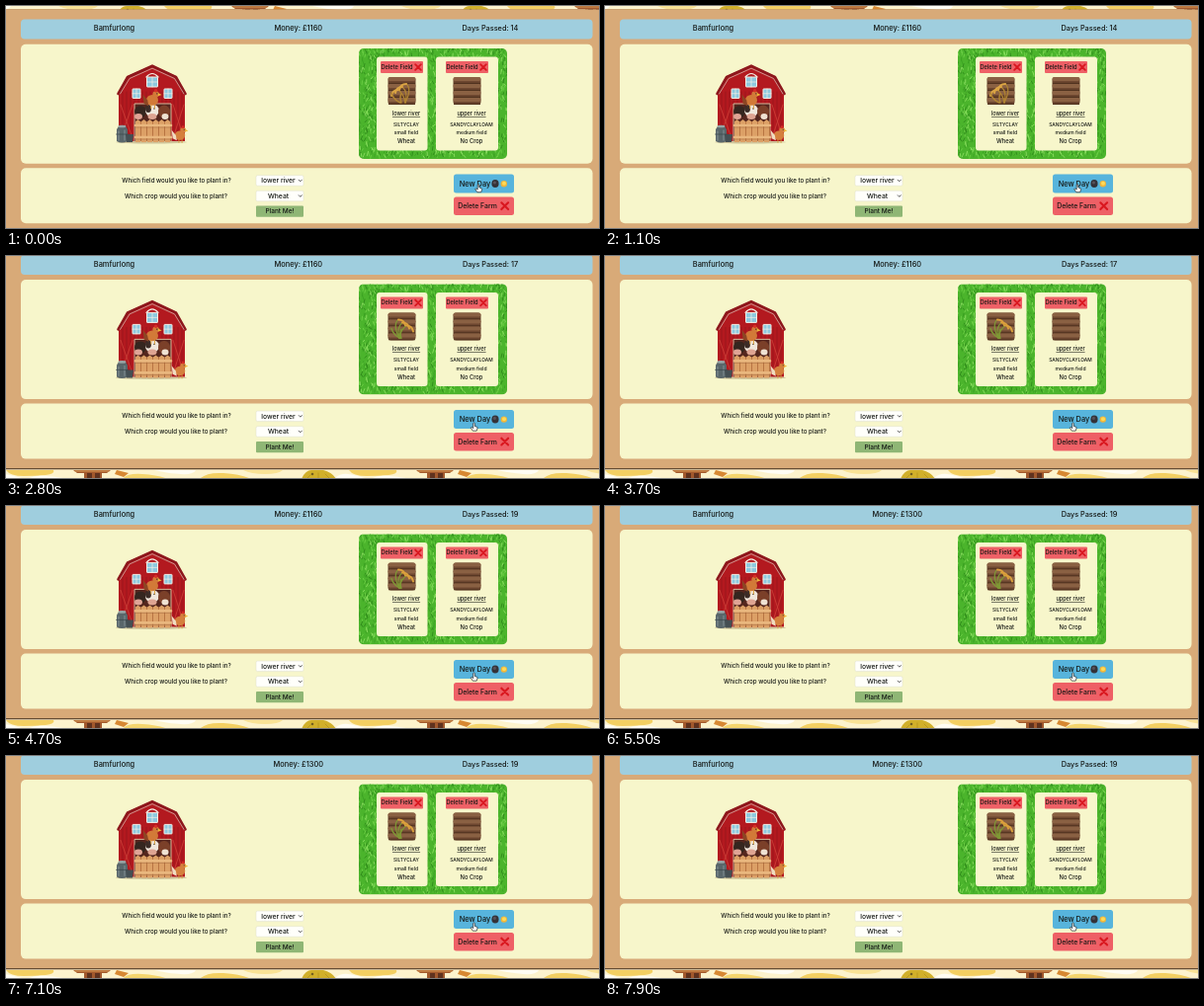
Animation, 600 px wide and 225 px high, one loop 8 s. Source, as an HTML page:

```html
<!DOCTYPE html>
<html lang="en">
<head>
<meta charset="utf-8">
<title>Farm dashboard</title>
<style>
html, body { margin: 0; width: 100%; height: 100%; overflow: hidden; background: #d8aa78; }
svg { display: block; width: 600px; height: 225px; }
text { font-family: Inter, "Open Sans", sans-serif; font-weight: 500; text-anchor: middle; fill: #141714; }
.line { fill: none; stroke-linecap: round; }
</style>
</head>
<body>
<svg id="stage" viewBox="0 0 600 225"></svg>
<script>
const stage = document.getElementById('stage');
const cream = '#f7f6cb', sky = '#9fcede', skyHover = '#57b4dc', red = '#ee6066', redHover = '#df575d';

const rect = (x, y, w, h, fill, r = 0, more = '') =>
  `<rect x="${x}" y="${y}" width="${w}" height="${h}" rx="${r}" fill="${fill}" ${more}/>`;
const ellipse = (x, y, rx, ry, fill) =>
  `<ellipse cx="${x}" cy="${y}" rx="${rx}" ry="${ry}" fill="${fill}"/>`;
const dot = (x, y, r, fill) => ellipse(x, y, r, r, fill);
const shape = (d, fill) => `<path d="${d}" fill="${fill}"/>`;
const line = (d, stroke, width) =>
  `<path class="line" d="${d}" stroke="${stroke}" stroke-width="${width}"/>`;
// y is the visual middle of the line of text
const label = (str, x, y, size, more = '') =>
  `<text x="${x}" y="${y + size * .36}" font-size="${size}" ${more}>${str}</text>`;
const cross = (x, y, r) =>
  line(`M${x - r} ${y - r}L${x + r} ${y + r}M${x + r} ${y - r}L${x - r} ${y + r}`, '#d9171f', r * .62);

let seed = 7;
const random = () => (seed = seed * 16807 % 2147483647) / 2147483647;

function pattern(y, h, shift) {
  let s = `<svg x="0" y="${y}" width="600" height="${h}">` + rect(0, 0, 600, h, '#fdf3cd');
  for (let k = -1; k < 3; k++) {
    const x = k * 347 + shift;
    s += shape(`M${x} 0h48q2 4 -8 5t-22 1q-14 0 -18 -6z`, '#f3cf62') +
      shape(`M${x + 22} 9q6 -4 18 -3t24 3z`, '#fffdf4') +
      shape(`M${x + 118} 9q4 -6 20 -5t26 5z`, '#f5d56d') +
      shape(`M${x + 150} 0h42q-2 5 -16 4t-26 -4z`, '#fffdf4') +
      shape(`M${x + 196} 9q6 -7 24 -6t28 6z`, '#f3cf62') +
      shape(`M${x + 240} 0h40q-4 4 -18 4t-22 -4z`, '#f9e295') +
      shape(`M${x + 332} 9q6 -6 14 -5t20 5z`, '#fffdf4') +
      // shed and tools
      shape(`M${x + 68} 0h38l-4 3h-5v6h-18v-6h-7z`, '#a2592d') +
      shape(`M${x + 82} 3h5v6h-5zM${x + 90} 3h5v6h-5z`, '#5f321e') +
      line(`M${x + 70} 1h34`, '#dc9c54', 1.2) +
      shape(`M${x + 112} 0l12 3 -5 4 -9 -3z`, '#d78832') +
      // haystack
      shape(`M${x + 299} 9q4 -9 10 -9h12q9 2 13 9z`, '#d1b02a') +
      line(`M${x + 308} 5l-4 4M${x + 316} 3v5M${x + 323} 4l4 4`, '#b4921d', .8) +
      dot(x + 310, 4, 1.3, '#756120');
  }
  return s + '</svg>';
}

function grass() {
  let s = `<clipPath id="lawn">${rect(357, 43, 150, 112, '#000', 5)}</clipPath>` +
    `<g clip-path="url(#lawn)">` + rect(357, 43, 150, 112, '#4bb42c');
  for (const color of ['#2b8519', '#72d34a', '#3aa022', '#93e468']) {
    let d = '';
    for (let i = 0; i < 420; i++)
      d += `M${(357 + random() * 150).toFixed(1)} ${(43 + random() * 112).toFixed(1)}` +
        `l${(random() * 4 - 2).toFixed(1)} ${(-1.5 - random() * 3).toFixed(1)}`;
    s += line(d, color, .8);
  }
  return s + '</g>';
}

function pane(x, y, w, h) {
  return rect(x, y, w, h, '#8dc9df', .5, 'stroke="#f5eee5" stroke-width="1"') +
    line(`M${x + w / 2} ${y}v${h}M${x} ${y + h / 2}h${w}`, '#f5eee5', .7);
}

function hen(x, y, k, body, wing) {
  return `<g transform="translate(${x} ${y}) scale(${k})">` +
    ellipse(0, 2, 5, 4.5, body) + shape('M-4 2l-4 -5 1 8 4 2z', wing) +
    dot(3, -3, 2.7, body) + dot(3, -6, 1.4, '#d62e26') +
    shape('M5 -4l3 1.5 -3 1z', '#f1bb39') + dot(4, -3.5, .5, '#222') +
    line('M-1 6v3M2 6v3', '#d89b35', .8) + '</g>';
}

function barn() {
  let s = ellipse(147, 138, 36, 1.5, '#cfc49a') +
    shape('M114 137V87L123 71 148 60 172 71 181 87V137z', '#b3191f');
  for (let x = 118; x < 180; x += 4) s += line(`M${x} 87v49`, '#8f151b', .6);
  s += line('M113.5 89L123 72 148 60.8 172 72 181.5 89', '#8d171c', 2.6) +
    line('M115.5 89L125 73.5 148 63.2 170.5 73.5 180 89', '#d9c9bd', .7) +
    pane(142.5, 72, 11, 10) + line('M142 72q6 -7 12 0', '#f5eee5', 1.2) +
    pane(128, 84, 8, 9.5) + pane(160, 84, 8, 9.5) +
    rect(130, 99, 37, 38, '#54261e') +
    line('M130 137V99H167V137', '#d8b89a', 1) +
    line('M116 100l12 34M128 100l-12 34M169 100l11 34M180 100l-11 34', '#d04239', .8) +
    // animals behind the fence
    ellipse(136, 107, 6, 6, '#35261f') + ellipse(134, 112, 4, 3, '#e0a596') +
    ellipse(148, 106, 7, 6.5, '#f0e7dc') + ellipse(144, 104, 3, 4, '#3b2b26') +
    ellipse(148, 112, 4.5, 3, '#dea492') + dot(150, 104, .7, '#222') +
    ellipse(160, 107, 6, 6.5, '#7b4029') + ellipse(161, 112, 3.5, 3, '#efe2d2') +
    hen(148, 93, 1.2, '#d27a38', '#8c4523') +
    rect(131, 117, 36, 20, '#b87442');
  for (let x = 131; x < 165; x += 6)
    s += shape(`M${x} 138v-21l2.5 -2 2.5 2v21z`, '#dca066');
  s += line('M131 121h36M131 133h36', '#e9b77e', 2.6) + line('M131 123h36M131 135h36', '#9c653d', .5) +
    // milk churn and pail
    shape('M112 125l2 -3h7l2 3v12q-6 3 -11 0z', '#59666a') + ellipse(117.5, 122, 4, 1.3, '#98a4a5') +
    line('M114 127v9M120 126v10', '#87959a', .9) +
    shape('M121 130h8l-1 8h-6z', '#454f53') + line('M111.5 130h12', '#39454a', .7) +
    hen(176, 129, 1.05, '#d5803d', '#f0dcc0');
  return s;
}

function soil(x, y) {
  let s = rect(x, y, 28, 28, '#6d4730', 3);
  for (let i = 0; i < 4; i++)
    s += rect(x, y + i * 7, 28, 4, '#8a6143', 2) + rect(x + .5, y + 5.8 + i * 7, 27, 1.1, '#50331f', .5);
  return s;
}

// stalks fan out from one root, each ending in a drooping ear
function wheat(stem, ear, side) {
  let s = '';
  for (let i = 0; i < 3; i++) {
    const x = 401 + side * (i * 4 - 4), top = 79 + i * 3;
    s += line(`M${401 - side * 3} 98Q${x - side * 6} ${top + 5} ${x} ${top}`, stem, 1.2) +
      line(`M${x} ${top}q${side * 6} 0 ${side * 7} 6`, ear, 2);
  }
  return s + line('M399 98q-7 -3 -9 -10M400 98q-2 -6 0 -9', stem, 1.4);
}

function card(x, w, mid, title, type, size, crop) {
  return rect(x, 51.5, w, 95, cream, 3) +
    rect(mid - 21.5, 56, 43, 12, red, 1) +
    label('Delete Field', mid - 5, 62, 5.7) + cross(mid + 16.5, 62, 2.9) +
    soil(mid - 14, 72) +
    label(title, mid + 4.5, 109, 5.55, 'text-decoration="underline"') +
    label(type, mid + 4.5, 120.3, 4.85) +
    label(size, mid + 4.5, 128.6, 5) + label(crop, mid + 4.5, 137.2, 5.8);
}

const select = (y, id, value) =>
  rect(253, y, 48, 10.5, '#fffffb', 1.5, 'stroke="#dddcca" stroke-width=".5"') +
  label(value, 275.5, y + 5.2, 6.8, `id="${id}"`) +
  line(`M296.3 ${y + 4.5}l1.5 1.6 1.5 -1.6`, '#333', .8);

stage.innerHTML =
  rect(0, 0, 600, 225, '#d8aa78') +
  `<g id="page">` +
  pattern(0, 3.5, 160) + rect(0, 3.3, 600, .5, '#b38658') +
  rect(15, 13.5, 578.5, 20, sky, 4) + rect(15, 38.7, 578.5, 121, cream, 5) +
  rect(15, 164.2, 578.5, 56, cream, 5) +
  label('Bamfurlong', 109.5, 22.8, 7.45) +
  label('', 295.8, 22.8, 7.45, 'id="money"') + label('', 490, 22.8, 7.3, 'id="days"') +
  `<g id="art">${barn()}${grass()}</g>` +
  card(375, 51.5, 400.5, 'lower river', 'SILTYCLAY', 'small field', 'Wheat') +
  card(435, 63, 466.5, 'upper river', 'SANDYCLAYLOAM', 'medium field', 'No Crop') +
  `<g id="ripe">${wheat('#b08432', '#dba544', -1)}</g>` +
  `<g id="young">${wheat('#7f9a35', '#dca03c', 1)}</g>` +
  label('Which field would you like to plant in?', 172.5, 176.6, 6.15) +
  label('Which crop would you like to plant?', 172, 192.4, 6.15) +
  select(171.7, 'field', 'lower river') + select(187.3, 'crop', 'Wheat') +
  rect(253, 202.5, 48, 11.3, '#8fb675', 1) + label('Plant Me!', 277, 208.1, 6.5) +
  rect(453, 170.5, 61, 19, sky, 2.5, 'id="newDay"') + label('New Day', 474.5, 180, 7.4) +
  ellipse(495, 180, 3.6, 4, '#343238') + dot(494.4, 179, 1.6, '#57525a') +
  dot(503.8, 180.2, 3.2, '#f0b53a') + dot(504, 179.8, 2, '#ffdb58') +
  rect(453, 193.5, 61, 18.5, red, 2.5, 'id="remove"') + label('Delete Farm', 477, 202.7, 6.9) +
  cross(504.7, 202.7, 3.4) +
  rect(0, 229.8, 600, 1.2, '#493523') + rect(0, 231, 600, .8, '#eee4c4') + pattern(231.6, 9, 0) +
  `</g>` +
  `<g id="hand"><path d="M-.8 -3.5Q0 -4.5 .8 -3.5V-.5L3 .2Q3.8 .6 3.4 2L2.7 4.2H-1.2L-3.2 1.2Q-3 .1 -1.8 .8L-.8 1.6z" ` +
  `fill="#fff" stroke="#161616" stroke-width=".65"/></g>`;

const el = id => document.getElementById(id);
const show = (id, on) => el(id).setAttribute('visibility', on ? 'visible' : 'hidden');
const dayAt = [[4500, 19], [4000, 18], [1700, 17], [1500, 16], [1250, 15], [0, 14]];

function draw(t) {
  const scrolled = t >= 1700, loading = scrolled && t < 2000;
  const move = Math.min(1, Math.max(0, (t - 2000) / 250));
  const ease = move * move * (3 - 2 * move);
  el('page').setAttribute('transform', `translate(0 ${scrolled ? -14.6 : 0})`);
  el('hand').setAttribute('transform', `translate(${478 - 4.5 * ease} ${184.5 - 11.5 * ease})`);
  el('days').textContent = 'Days Passed: ' + dayAt.find(d => t >= d[0])[1];
  el('money').textContent = 'Money: £' + (t < 5400 ? 1160 : 1300);
  el('crop').textContent = loading ? '' : 'Wheat';
  show('art', !loading);
  show('ripe', !scrolled);
  show('young', scrolled);
  const overDelete = scrolled && ease < .7;
  el('newDay').setAttribute('fill', overDelete ? sky : skyHover);
  el('remove').setAttribute('fill', overDelete ? redHover : red);
}

function tick() {
  draw(performance.now() % 8000);
  requestAnimationFrame(tick);
}
tick();
</script>
</body>
</html>
```
